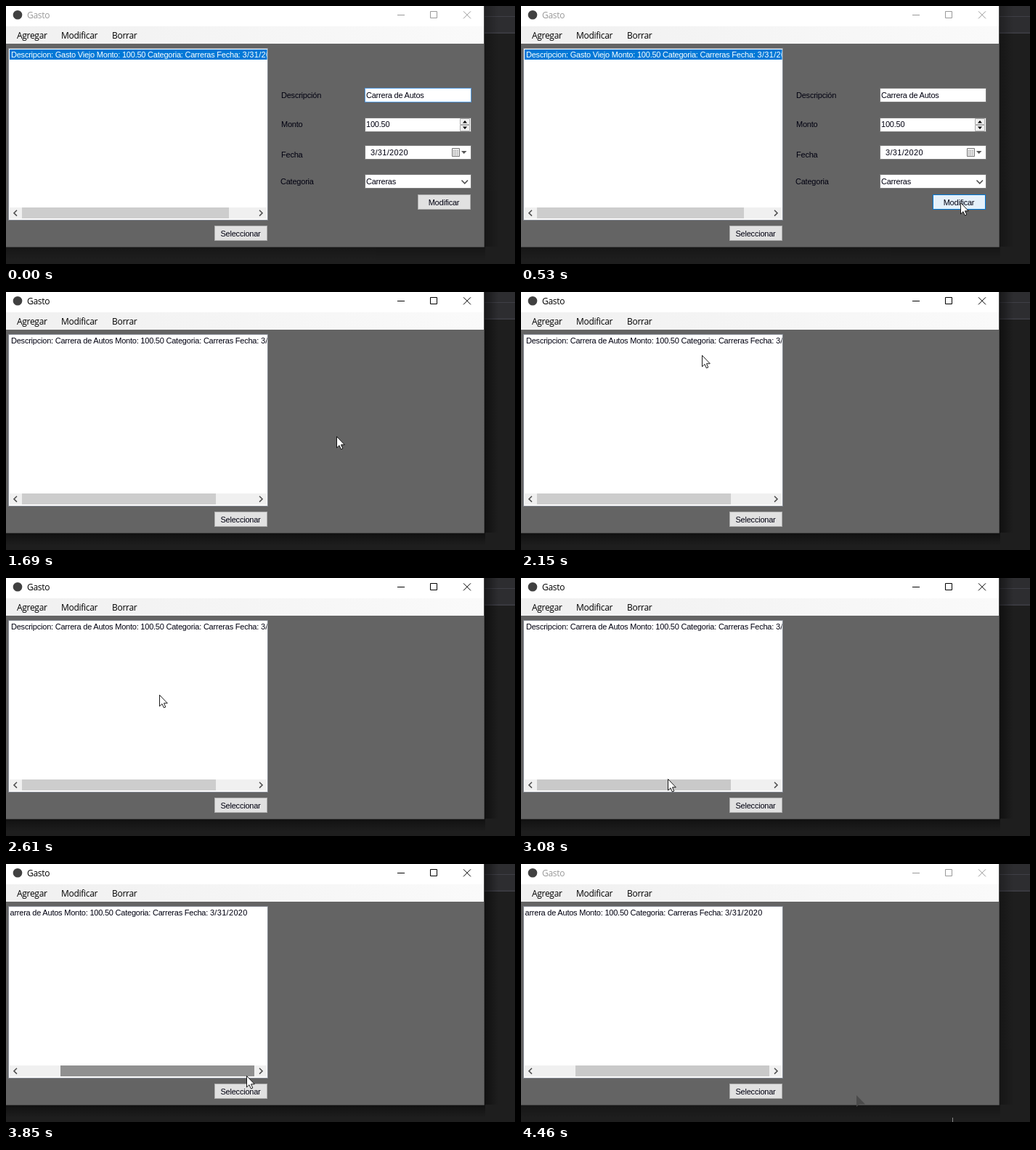
These frames come from a looping animation (701x356 px, 4620 ms). An HTML page:

```html
<!DOCTYPE html>
<html lang="es">
<head>
<meta charset="utf-8">
<title>Gasto</title>
<style>
  html, body { margin: 0; width: 100%; height: 100%; overflow: hidden; background: #1e1e1e; }
  svg { display: block; width: 100%; height: 100%; }
  text { white-space: pre; font: 11px "Liberation Sans", Arial, sans-serif; letter-spacing: -.22px; fill: #000010; }
  .date { letter-spacing: .32px; }
  .ui { font: 12px "Open Sans", "Noto Sans", sans-serif; letter-spacing: -.3px; fill: #000; }
  .mid { text-anchor: middle; }
  .field { fill: #fff; stroke: #7a7a7a; }
  .button { fill: #e1e1e1; stroke: #adadad; }
  .arrow { fill: none; stroke: #505050; stroke-width: 1.6; }
</style>
</head>
<body>
<svg viewBox="0 0 701 356">
  <defs>
    <linearGradient id="menuFill"><stop stop-color="#f0f0f0"/><stop offset="1" stop-color="#fafafa"/></linearGradient>
    <linearGradient id="shadeX"><stop stop-opacity=".5"/><stop offset="1" stop-opacity="0"/></linearGradient>
    <linearGradient id="shadeY" x2="0" y2="1"><stop stop-opacity=".45"/><stop offset="1" stop-opacity="0"/></linearGradient>
    <clipPath id="listClip"><path d="M5 59H359.5V278H5z"/></clipPath>
  </defs>

  <!-- editor behind the window -->
  <path fill="#1e1e1e" d="M0 0H701V356H0z"/>
  <path fill="#2d2d30" d="M658 0H701V37H658z"/>
  <path fill="#3f3f46" d="M658 14H701V15H658zM658 36.5H701V38H658z"/>
  <g id="shadow">
    <path fill="url(#shadeX)" d="M658 0H678V332H658z"/>
    <path fill="url(#shadeY)" d="M0 332H660V350H0z"/>
  </g>

  <!-- window -->
  <path fill="#646464" d="M0 52H658V332H0z"/>
  <path fill="#fff" d="M0 0H658V28H0z"/>
  <path fill="url(#menuFill)" d="M0 28H658V52H0z"/>
  <path fill="none" stroke="#4c4c4c" d="M658.5 0V332.5H0"/>
  <circle cx="16" cy="12.3" r="6.3" fill="#404040"/>
  <text id="title" class="ui" x="29" y="17">Gasto</text>
  <path id="controls" fill="none" d="M539 12.5H549M584.5 7.5H593.5V16.5H584.5zM630 7.3L640 17.3M640 7.3L630 17.3"/>
  <text class="ui" x="15" y="44.5">Agregar</text>
  <text class="ui" x="76" y="44.5">Modificar</text>
  <text class="ui" x="146" y="44.5">Borrar</text>

  <!-- list -->
  <rect x="3.5" y="58.5" width="357" height="237" fill="#fff" stroke="#828790"/>
  <g clip-path="url(#listClip)">
    <rect id="selection" x="5" y="60" width="355" height="14" fill="#0078d7"/>
    <text id="item" y="71"><tspan id="itemText"></tspan><tspan class="date">3/31/2020</tspan></text>
  </g>
  <path fill="#f0f0f0" d="M5 278H359.5V293.5H5z"/>
  <rect id="thumb" y="278" height="15"/>
  <path class="arrow" d="M15 281.8L11 285.7L15 289.6M349 281.8L353 285.7L349 289.6"/>
  <rect class="button" x="287.5" y="303.5" width="72" height="20"/>
  <text class="mid" x="323" y="318">Seleccionar</text>

  <!-- edit form -->
  <g id="form">
    <text x="379" y="127">Descripción</text>
    <text x="379" y="167">Monto</text>
    <text x="379" y="209">Fecha</text>
    <text x="378" y="246">Categoria</text>
    <rect id="nameBox" class="field" x="494.5" y="113.5" width="146" height="19"/>
    <rect class="field" x="494.5" y="154.5" width="146" height="19"/>
    <rect class="field" x="494.5" y="192.5" width="146" height="19"/>
    <rect class="field" x="494.5" y="232.5" width="146" height="19"/>
    <text x="496" y="127">Carrera de Autos</text>
    <text x="496" y="167">100.50</text>
    <text class="date" x="502" y="206">3/31/2020</text>
    <text x="496" y="246">Carreras</text>
    <path fill="#f0f0f0" stroke="#acacac" d="M625.5 155.5H638.5V163.5H625.5zM625.5 164.5H638.5V172.5H625.5z"/>
    <path d="M629 161.5H635L632 158zM629 166.5H635L632 170z"/>
    <path fill="#ececec" stroke="#777" d="M614.5 196.5H624.5V207.5H614.5z"/>
    <path stroke="#999" stroke-dasharray="1.5 1" d="M616 199.5H623M616 201.5H623M616 203.5H623M616 205.5H623"/>
    <path fill="#555" d="M627 200H634.5L630.7 204z"/>
    <path class="arrow" stroke-width="1.2" d="M627.5 240.5L631.8 244.8L636 240.5"/>
    <rect id="modify" x="567.5" y="260.5" width="72" height="20"/>
    <text class="mid" x="603" y="275">Modificar</text>
  </g>

  <path id="trail" fill="#4a4a4a" d="M462 319V335L466 331.5H474z"/>
  <path id="caret" stroke="#8a8a8a" d="M594.5 350V356"/>
  <circle id="press" r="12" fill="#b6b22c" fill-opacity=".92"/>
  <path id="cursor" fill="#fff" stroke="#000" stroke-width=".9" d="M.5 .5V16L4 12.7L6.4 18L8.8 17L6.5 11.8H11.3z"/>
</svg>
<script>
const LOOP = 4620, STEP = 76.92, DRAG_X = 209, MAX_SCROLL = 53;

// time, x, y of the pointer tip
const path = [
  [70, 648, 330], [530, 605, 271], [1462, 605, 271], [2000, 255, 102],
  [2150, 249, 88], [2300, 238, 65], [2530, 216, 120], [2840, 198, 268],
  [3080, 202, 277], [3240, 206, 288], [3390, 214, 289], [3470, 228, 290],
  [3700, 331, 292], [3850, 331, 292], [3930, 462, 319], [4000, 590, 349], [4080, 640, 380]
];

const el = id => document.getElementById(id);
const clamp = (v, a, b) => Math.min(b, Math.max(a, v));
const set = (id, attrs) => { for (const k in attrs) el(id).setAttribute(k, attrs[k]); };
const show = (id, on) => set(id, { visibility: on ? 'visible' : 'hidden' });
const grey = v => `rgb(${v},${v},${v})`;

function pointerAt(t) {
  let i = 1;
  while (i < path.length - 1 && path[i][0] < t) i++;
  const [t0, x0, y0] = path[i - 1], [t1, x1, y1] = path[i];
  const k = clamp((t - t0) / (t1 - t0), 0, 1);
  return [Math.round(x0 + (x1 - x0) * k), Math.round(y0 + (y1 - y0) * k)];
}

function thumbShade(t) {
  if (t < 2840) return 205;
  if (t < 3240) return 201;
  if (t < 3850) return 96;
  return Math.round(144 + 57 * clamp((t - 3850) / 380, 0, 1));
}

function draw(t) {
  const tick = Math.floor((t + 10) / STEP) * STEP;
  const [x, y] = pointerAt(tick);
  const active = t >= 760 && t < 4460;
  const saved = t >= 990;
  const clicking = t >= 760 && !saved;
  const dragging = t >= 3240 && t < 3850;
  const scroll = t < 3240 ? 0 : clamp(x - DRAG_X, 0, MAX_SCROLL);
  const hover = t >= 380;

  set('title', { style: `fill:${active ? '#000' : '#999'}` });
  set('controls', { stroke: active ? '#000' : '#999' });
  set('shadow', { opacity: active ? 1 : .6 });

  show('form', !saved);
  set('nameBox', { style: `stroke:${t < 150 ? '#569de5' : '#7a7a7a'}` });
  set('modify', {
    fill: clicking ? '#cce4f7' : hover ? '#e5f1fb' : '#e1e1e1',
    stroke: clicking ? '#005499' : hover ? '#0078d7' : '#adadad'
  });

  show('selection', !saved);
  el('itemText').textContent =
    `Descripcion: ${saved ? 'Carrera de Autos' : 'Gasto Viejo'} Monto: 100.50 Categoria: Carreras Fecha: `;
  set('item', { x: 7 - scroll * 1.32, style: saved ? '' : 'fill:#fff' });
  set('thumb', { x: 22 + scroll, width: saved ? 267 : 285, fill: grey(thumbShade(t)) });

  show('press', clicking || dragging);
  set('press', { cx: x - 1, cy: y });
  show('cursor', t >= 70 && t < 4080);
  set('cursor', { transform: `translate(${x} ${y})` });
  show('trail', t >= 4000);
  show('caret', t >= 4080);
}

const start = performance.now();
function loop() {
  draw((performance.now() - start) % LOOP);
  requestAnimationFrame(loop);
}
loop();
</script>
</body>
</html>
```
